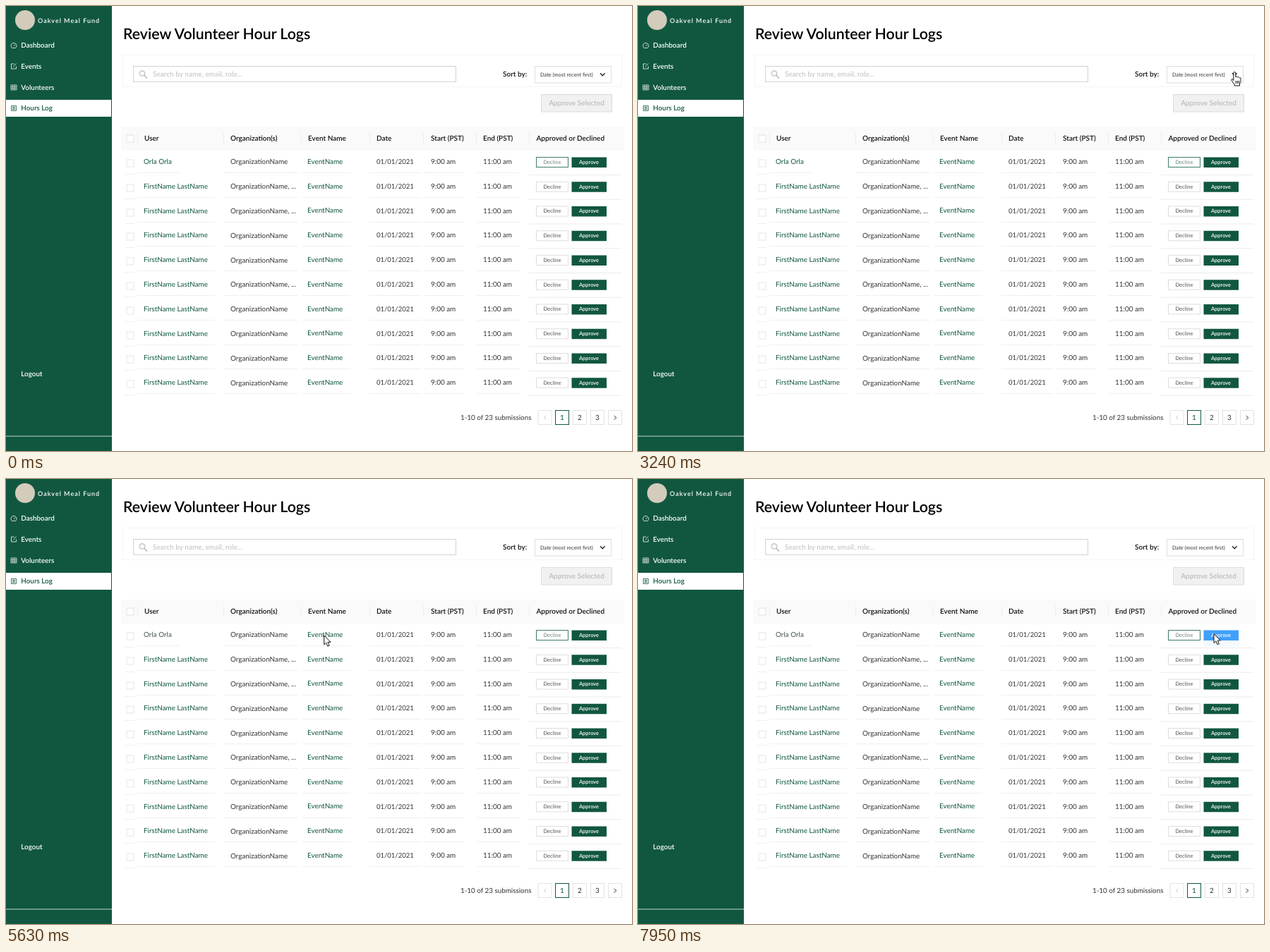
Animation of 887x631 px, one loop 8000 ms. Source, as an HTML page:

```html
<!DOCTYPE html>
<html lang="en">
<head>
<meta charset="utf-8">
<title>Hours log</title>
<style>
html, body { margin: 0; width: 100%; height: 100%; overflow: hidden; background: #fff; }
svg { display: block; width: 887px; height: 631px; font: 10px Lato, "Open Sans", sans-serif; }
text { white-space: pre; text-rendering: geometricPrecision; }
.b { font-weight: 600; }
</style>
</head>
<body>
<svg id="stage" viewBox="0 0 887 631"></svg>
<script>
const GREEN = '#115740', INK = '#333', LINE = '#f0f0f0', BLUE = '#40a0fa';
const out = [];
const rect = (x, y, w, h, fill, stroke = 'none', extra = '') =>
  out.push(`<rect x="${x}" y="${y}" width="${w}" height="${h}" fill="${fill}" stroke="${stroke}" ${extra}/>`);
const text = (x, y, s, fill = INK, size = 9.9, extra = '') =>
  out.push(`<text x="${x}" y="${y}" fill="${fill}" font-size="${size}" ${extra}>${s}</text>`);
const bold = (x, y, s, fill = '#111', size = 10, extra = '') => text(x, y, s, fill, size, 'class="b" ' + extra);
const path = (d, stroke, width = 1) =>
  out.push(`<path d="${d}" fill="none" stroke="${stroke}" stroke-width="${width}"/>`);
const MID = 'text-anchor="middle"';

// Sidebar
rect(0, 0, 150, 631, GREEN);
rect(0, 133, 149, 24, '#fff');
rect(0, 609.5, 150, 1, '#c4d5ce');
out.push('<circle cx="27" cy="20" r="14" fill="#d3cbbb"/>');
bold(45, 24, 'Oakvel Meal Fund', '#fff', 9, 'letter-spacing="1"');
['Dashboard', 'Events', 'Volunteers', 'Hours Log'].forEach((s, i) =>
  bold(21.3, 59 + i * 29.8, s, i == 3 ? GREEN : '#fff', 9.9));
bold(21.3, 525, 'Logout', '#fff', 9.9);
path('M8.5 59.5A4 4 0 1 1 13.5 59.5ZM11 57L13 54.5', '#dfe9e5', .9);
path('M11.5 82H7.5V89H14.5V85.5M10 86.5L14.5 81.5', '#dfe9e5', .9);
path('M7 112H15V119H7ZM7 114.5H15M7 116.8H15M9.7 112V119M12.3 112V119', '#dfe9e5', .8);
path('M7.5 141.5H14.5V148.5H7.5ZM9 143.5H13M9 145H13M9 146.5H13', GREEN, .8);

// Heading and filters
bold(166, 47, 'Review Volunteer Hour Logs', '#000', 21.3);
rect(165.5, 69.5, 707, 45, '#fff', '#f5f5f5');
rect(180.5, 85.5, 457, 22, '#fff', '#d2d2d2');
out.push('<circle cx="193" cy="95.5" r="3.8" fill="none" stroke="#aaa"/>');
path('M196 98.5L200 102.5', '#aaa', 1.1);
text(208, 100, 'Search by name, email, role...', '#bfbfbf', 10.1);
bold(704, 100, 'Sort by:');
rect(758.5, 125.5, 100, 24.5, '#f1f1f1', '#dcdcdc');
bold(808.5, 141.3, 'Approve Selected', '#bcbcbc', 10.1, MID);
rect(749.5, 85.5, 108, 23.5, '#fff', '#dedede');
text(757, 99.7, 'Date (most recent first)', INK, 7.4);
path('M842 95.3L845.3 98.7L848.6 95.3', '#222', 1.3);

// Table
rect(163, 171, 713, 35, '#fafafa');
rect(171, 183, 10, 10, '#fff', '#e2e2e2');
const cols = [[196, 'User'], [318, 'Organization(s)'], [428, 'Event Name'], [525, 'Date'],
  [602, 'Start (PST)'], [676, 'End (PST)'], [751.5, 'Approved or Declined']];
cols.forEach(([x, s]) => bold(x, 191, s));
[186, 308, 417.5, 515, 591, 666, 741].forEach(x => rect(x, 180, 1, 15, '#ececec'));

for (let i = 0; i < 10; i++) {
  const y = 224 + i * 34.8, by = 214.5 + i * 34.75;
  const many = [1, 2, 5].includes(i);
  rect(171, Math.round(y - 6), 10, 10, '#fff', '#e6e6e6');
  text(195, y, i ? 'FirstName LastName' : 'Orla Orla', GREEN, 9.9, i ? '' : 'id="user"');
  text(318, y + .3, 'OrganizationName' + (many ? ', ...' : ''));
  text(427, y - .2, 'EventName', GREEN);
  text(525, y, '01/01/2021', INK, 9.5);
  text(602, y, '9:00 am');
  text(676, y, '11:00 am');
  const ly = Math.round(y + 12);
  [[186, i ? 296 : 246], [308, 412], [419, 488], [515, 589], [592, 649], [667, 728]].forEach(([a, b]) =>
    rect(a, ly, b - a, 1, LINE));
  rect(168, ly + 2, 15, 1, LINE);
  rect(741, by + 24.5, 131, 1, '#ebebeb');
  rect(751.5, by, 45, 14, '#fff', i ? '#dedede' : '#3f7c67');
  text(774, by + 9.4, 'Decline', i ? '#555' : '#71897f', 7.6, MID);
  if (!i) rect(801, 213, 51, 24.5, BLUE, 'none', 'id="glow" opacity="0"');
  rect(801.5, by, 49.5, 14.5, GREEN, 'none', i ? '' : 'id="approve"');
  bold(826, by + 9.4, 'Approve', '#fff', 7.5, MID);
}

// Pagination
text(644, 586.5, '1-10 of 23 submissions', INK, 9.85);
[754, 778.5, 803.5, 828.5, 853.5].forEach((x, i) => {
  rect(x, 573.5, 19, 20, '#fff', i == 1 ? GREEN : '#e2e2e2');
  if (i > 0 && i < 4) text(x + 9.5, 587, i, i == 1 ? GREEN : INK, 10, MID);
});
path('M765.5 581L762 583.7L765.5 586.4', '#ccc');
path('M861.5 581L865 583.7L861.5 586.4', '#444');

// Sort menu
out.push('<g id="menu" opacity="0">');
rect(749.5, 109, 108, 38.5, '#fff', '#dedede');
text(757, 121.5, 'Date (most recent first)', INK, 7.4);
text(757, 139, 'Date (least recent first)', INK, 7.4);
out.push('</g>');

// Pointers, both with the tip at 0,0
out.push(`<g id="cursor" fill="#fff" stroke="#111" stroke-linejoin="round">
<path id="arrow" d="M0 .5V13.5L3 10.8L5.1 15.8L7.4 14.8L5.3 10H9.3Z"/>
<path id="hand" d="M-1.5 12V1.5Q-1.5 0 0 0T1.5 1.5V7Q3 5.5 4.3 7.5Q6 6.3 6.9 8.2Q8.7 7.6 8.8 9.8V13Q8.8 15 7.2 17V19.5H-.2V17.5Q-2 15.5-4.3 12Q-5 10.5-3.8 10Q-2.8 9.8-1.5 12ZM2 12.5V16.5M4.2 12.5V16.5M6.3 12.5V16.5"/>
</g>`);

document.getElementById('stage').innerHTML = out.join('');
const $ = id => document.getElementById(id);

const lin = p => p, slow = p => 1 - (1 - p) ** 2.2, decel = p => p * (2 - p), smooth = p => p * p * (3 - 2 * p);
// time, tip x, tip y, easing on the way there
const keys = [
  [1180, 888, 168, lin], [1970, 845.3, 93.5, slow], [3610, 845.3, 93.5, lin],
  [4270, 204, 239, smooth], [4370, 201.5, 234, lin], [4450, 201.5, 234, lin],
  [4470, 198, 232, lin], [4680, 191, 226, decel], [5270, 359, 220, smooth],
  [5290, 360, 220, lin], [6080, 494, 222, decel], [6100, 495, 222, lin],
  [6640, 782, 226, decel], [6860, 782, 226, lin], [7320, 820, 222, smooth],
  [7460, 820, 222, lin], [7680, 821, 213, smooth], [7950, 816, 219, smooth]
];

function tip(t) {
  const n = keys.findIndex(k => k[0] > t);
  if (n < 1) return n ? keys.at(-1).slice(1, 3) : [900, 190];
  const [t0, x0, y0] = keys[n - 1], [t1, x1, y1, ease] = keys[n];
  const p = ease((t - t0) / (t1 - t0));
  return [x0 + (x1 - x0) * p, y0 + (y1 - y0) * p];
}

const ramp = (t, a, b) => Math.min(1, Math.max(0, (t - a) / (b - a)));
const mix = (a, b, p) => `rgb(${a.map((v, i) => Math.round(v + (b[i] - v) * p))})`;

function draw(t) {
  const [x, y] = tip(t);
  const onSelect = x >= 749 && x <= 858 && y >= 84 && y <= 109;
  $('cursor').setAttribute('transform', `translate(${x} ${y})`);
  $('hand').setAttribute('display', onSelect ? 'inline' : 'none');
  $('arrow').setAttribute('display', onSelect ? 'none' : 'inline');
  $('menu').setAttribute('opacity', ramp(t, 2000, 2250) - ramp(t, 2950, 3240));
  $('user').setAttribute('fill', t < 4680 ? GREEN : '#44544e');
  $('approve').setAttribute('fill', mix([17, 87, 64], [64, 160, 250], ramp(t, 7080, 7300)));
  $('glow').setAttribute('opacity', .05 * ramp(t, 7460, 7700));
}

const start = performance.now();
(function tick() {
  draw((performance.now() - start) % 8000);
  requestAnimationFrame(tick);
})();
</script>
</body>
</html>
```
